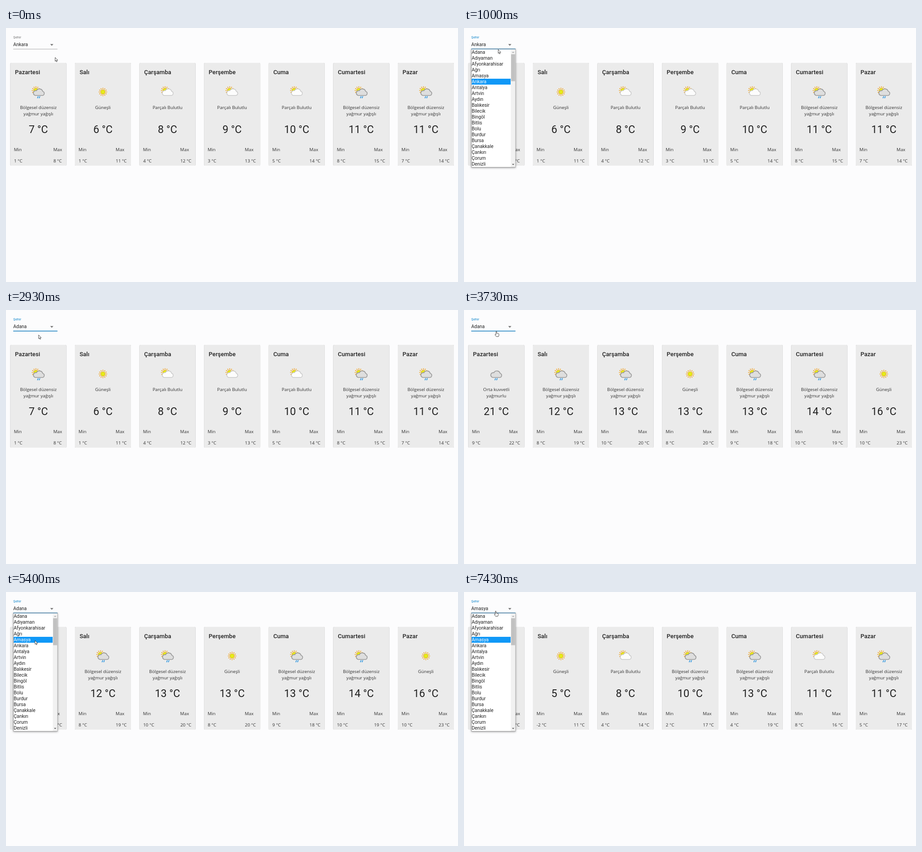
An HTML page that plays this animation: 998x561 px, repeating every 8000 ms.

```html
<!DOCTYPE html>
<html lang="tr">
<head>
<meta charset="utf-8">
<title>Haftalık hava durumu</title>
<style>
  html, body { margin: 0; height: 100%; overflow: hidden; background: #fcfcfd; }
  svg { display: block; width: 100vw; height: 100vh; }
  text { font: 400 10.4px Roboto, sans-serif; fill: #212121; }
  .body { font: 400 9.85px "Open Sans", sans-serif; fill: #303030; }
  .title { font-size: 13px; font-weight: 500; letter-spacing: .04px; }
  .temp { font-size: 23.2px; }
  .mid { text-anchor: middle; }
  .label { font-size: 7.8px; }
  .card { fill: #ebebeb; filter: drop-shadow(0 .8px .7px rgba(0,0,0,.36)); }
  .popup { fill: #fff; stroke: #8a8a8a; stroke-width: .7; filter: drop-shadow(0 1.5px 2px rgba(0,0,0,.4)); }
  .cursor { fill: #fff; stroke: #222; stroke-width: .8; stroke-linejoin: round; }
</style>
</head>
<body>
<svg viewBox="0 0 998 561">
  <defs>
    <g id="sun">
      <path id="rays" fill="none" stroke="#f0a62a" stroke-width="1.7"/>
      <circle r="5.1" fill="#e5ea1a" stroke="#e5ad2c" stroke-width="1.1"/>
    </g>
    <path id="cloud" d="M-7.5 7H8a4.6 4.6 0 0 0 1.2-9a7.6 7.6 0 0 0-14-1.5a5.2 5.2 0 0 0-2.7 10.5z"/>
    <g id="shower">
      <use href="#cloud" fill="#dedede" stroke="#999" stroke-width="1.7"/>
      <path d="M-.7 8.6l-2 4.5M3 8.6l-2 4.5" stroke="#2b95e0" stroke-width="1.6"/>
    </g>
    <g id="s"><use href="#sun" y="-.7"/></g>
    <g id="p"><use href="#sun" x="-5.3" y="-4"/><use href="#cloud" fill="#fcfcfc" stroke="#c9c9c9" stroke-width="1.5"/></g>
    <g id="r"><use href="#sun" x="-5.3" y="-4"/><use href="#shower" x=".6"/></g>
    <g id="h"><use href="#shower" x="-.7"/></g>
  </defs>
  <g id="cards"></g>
  <text id="label" class="label" x="16" y="23.3">Şehir</text>
  <text id="value" x="16" y="40.2"></text>
  <path d="M97.6 35.6h7l-3.5 3.6z" fill="#707070"/>
  <path d="M16 46.6h97.6" stroke="#949494" stroke-width=".8"/>
  <path id="focus" stroke="#0f7cc0" stroke-width="1.4"/>
  <g id="popup">
    <rect class="popup" x="16.3" y="46.6" width="97.4" height="260.8"/>
    <path d="M16 46.6h97.8" stroke="#2d6d98"/>
    <rect id="mark" x="17" width="86" height="13" fill="#1098f7"/>
    <g id="items"></g>
    <rect x="103.3" y="47.3" width="10" height="259.6" fill="#f1f1f1"/>
    <rect x="104" y="58" width="8.8" height="59.5" fill="#c1c1c1"/>
    <path d="M106 54.8h5l-2.5-2.6z" fill="#a3a3a3"/>
    <path d="M106 300.2h5l-2.5 2.6z" fill="#505050"/>
  </g>
  <path id="cursor" class="cursor"/>
</svg>
<script>
const $ = id => document.getElementById(id);
const text = (x, y, str, cls = '') => `<text x="${x}" y="${y}" class="${cls}">${str}</text>`;

const days = ['Pazartesi', 'Salı', 'Çarşamba', 'Perşembe', 'Cuma', 'Cumartesi', 'Pazar'];
const cities = ['Adana', 'Adıyaman', 'Afyonkarahisar', 'Ağrı', 'Amasya', 'Ankara', 'Antalya', 'Artvin',
  'Aydın', 'Balıkesir', 'Bilecik', 'Bingöl', 'Bitlis', 'Bolu', 'Burdur', 'Bursa', 'Çanakkale',
  'Çankırı', 'Çorum', 'Denizli'];
const sky = {
  s: ['Güneşli'],
  p: ['Parçalı Bulutlu'],
  r: ['Bölgesel düzensiz', 'yağmur yağışlı'],
  h: ['Orta kuvvetli', 'yağmurlu']
};
// per day: sky, current, min, max
const forecasts = {
  Ankara: 'r 7 1 8,s 6 1 11,p 8 4 12,p 9 3 13,p 10 5 14,r 11 8 15,r 11 7 14',
  Adana: 'h 21 9 22,r 12 8 19,r 13 10 20,s 13 8 20,r 13 9 18,r 14 10 19,s 16 10 23',
  Amasya: 'h 7 -1 8,s 5 -2 11,p 8 4 14,r 10 2 17,r 13 4 19,p 11 8 16,r 11 5 17'
};

const LOOP = 8000, FOCUS = 720;
const values = [[0, 'Ankara'], [2900, 'Adana'], [5450, 'Amasya']];
const loaded = [[0, 'Ankara'], [3420, 'Adana'], [5930, 'Amasya']];
const open = [[0, false], [780, true], [1450, false], [2080, true], [2900, false],
  [4500, true], [5450, false], [7300, true]];
const shapes = [[0, 'arrow'], [600, 'hand'], [900, 'arrow'], [1400, 'hand'], [2080, 'arrow'],
  [3600, 'hand'], [4640, 'arrow'], [6650, 'hand']];
const path = [[0, 108.5, 65], [30, 108.5, 65], [700, 76, 42], [870, 76, 42], [1000, 75.5, 47.5],
  [1200, 75, 60], [1450, 72, 45], [1900, 72, 45], [2000, 72, 53], [2200, 72, 55], [3370, 72, 55],
  [3730, 71.5, 47], [4100, 71.5, 42], [4230, 71.5, 42], [4600, 71.5, 45], [4800, 64, 107],
  [6230, 64, 107], [6400, 62.5, 60.5], [7030, 70, 42], [LOOP, 70, 42]];
const outlines = {
  arrow: 'M0 0V8.4L1.9 6.7 3.1 9.7 4.4 9.1 3.2 6.2H5.8z',
  hand: 'M-.9 1a.9.9 0 0 1 1.8 0V4.4L4.8 5.3a1 1 0 0 1 .8 1V9L4.6 11.7H-.2L-3 8a.9.9 0 0 1 1.2-1.2L-.9 7.6z'
};

const at = (steps, t) => steps.findLast(s => s[0] <= t)[1];
const clamp = v => Math.min(1, Math.max(0, v));

function position(t) {
  const i = path.findIndex(p => p[0] > t);
  const [t0, x0, y0] = path[i - 1], [t1, x1, y1] = path[i];
  const k = (t - t0) / (t1 - t0);
  return [x0 + (x1 - x0) * k, y0 + (y1 - y0) * k];
}

function card(day, i) {
  const x = 9.4 + i * 142.6, mid = x + 62;
  const [kind, now, min, max] = day.split(' ');
  const right = x + (max.length > 1 ? 90 : 95);
  return `<rect class="card" x="${x}" y="77" width="124" height="227" rx="2.6"/>` +
    text(x + 10.4, 102.3, days[i], 'title') +
    `<use href="#${kind}" x="${mid}" y="142"/>` +
    sky[kind].map((line, n) => text(mid, 179.2 + 14 * n, line, 'body mid')).join('') +
    text(mid, 231.6, now + ' °C', 'temp mid') +
    text(x + 8, 272.2, 'Min', 'body') + text(x + 8.3, 296.6, min + ' °C', 'body') +
    text(right, 272.2, 'Max', 'body') + text(right + .3, 296.6, max + ' °C', 'body');
}

let shown;
function draw(t) {
  const city = at(loaded, t), value = at(values, t), shape = at(shapes, t);
  const [x, y] = position(t);
  if (city !== shown) {
    $('cards').innerHTML = forecasts[city].split(',').map(card).join('');
    shown = city;
  }
  const k = clamp((t - FOCUS) / 200), half = 48.8 * k;
  $('label').style.fill = `color-mix(in srgb, #1286cb ${k * 100}%, #757575)`;
  $('focus').setAttribute('d', k ? `M${64.8 - half} 46.5h${half * 2}` : '');
  $('value').textContent = value;

  const hovering = shape === 'arrow' && y > 50;
  const row = hovering ? Math.floor((y - 47) / 13) : cities.indexOf(value);
  $('popup').style.display = at(open, t) ? '' : 'none';
  $('mark').setAttribute('y', 47 + 13 * row);
  [...$('items').children].forEach((el, i) => el.style.fill = i === row ? '#fff' : '');

  $('cursor').setAttribute('d', outlines[shape]);
  $('cursor').setAttribute('transform', `translate(${x} ${y})`);
}

$('items').innerHTML = cities.map((c, i) => text(17, 57.3 + 13 * i, c)).join('');
$('rays').setAttribute('d', Array.from({ length: 12 }, (_, i) => {
  const c = Math.cos(i * Math.PI / 6), s = Math.sin(i * Math.PI / 6);
  return `M${6.6 * c} ${6.6 * s}L${9.3 * c} ${9.3 * s}`;
}).join(''));

const start = performance.now();
function tick() {
  draw((performance.now() - start) % LOOP);
  requestAnimationFrame(tick);
}
tick();
</script>
</body>
</html>
```
